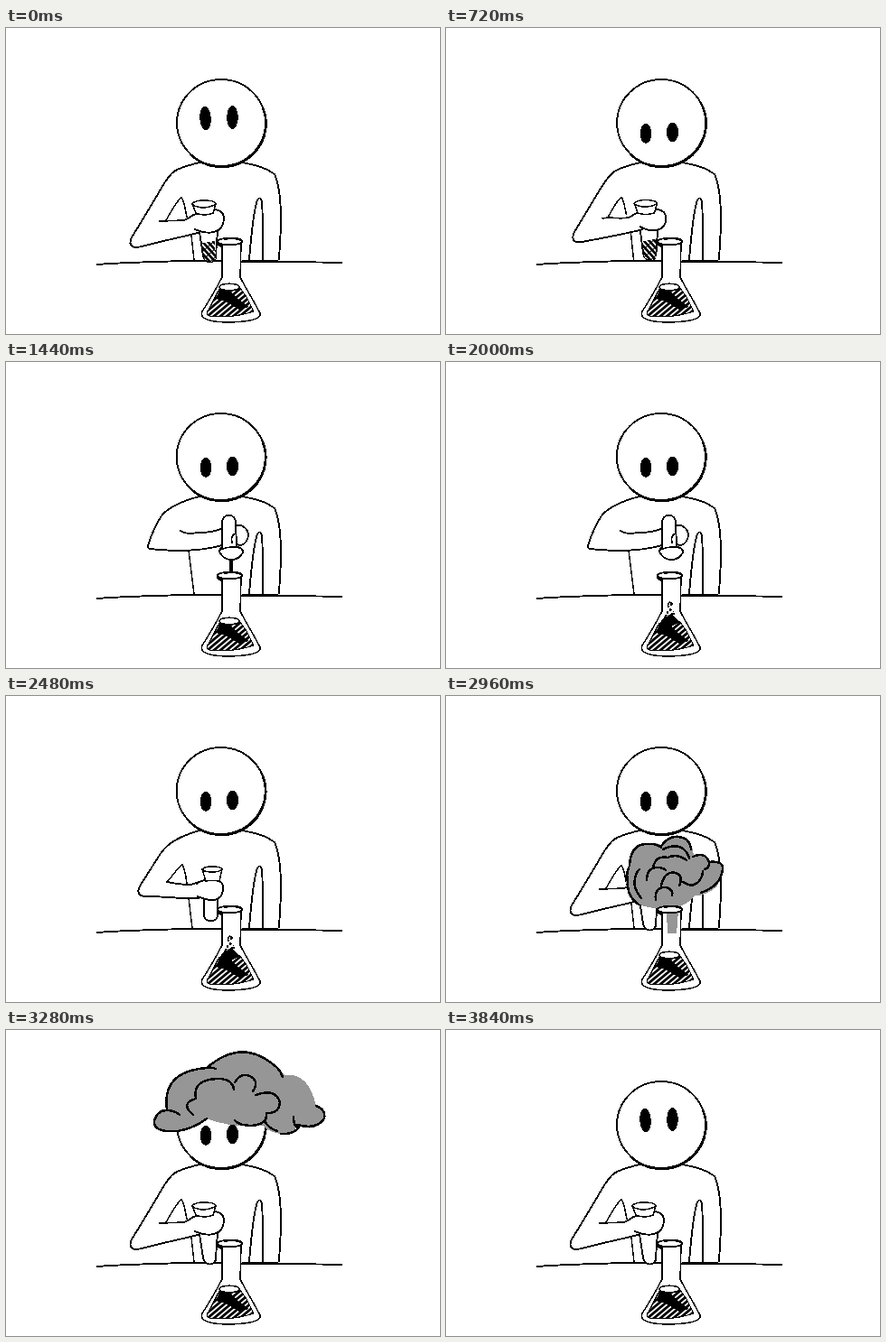
Write an HTML page that moves like this. It is 480x339 px and loops after 4.56 s.

```html
<!DOCTYPE html>
<html lang="en">
<head>
<meta charset="utf-8">
<title>Lab experiment</title>
<style>
  html, body { margin: 0; width: 100%; height: 100%; overflow: hidden; background: #fff; }
  svg { display: block; width: 100vw; height: 100vh; shape-rendering: crispEdges; }
  path, ellipse, circle { fill: none; stroke: #000; stroke-width: 1.9; stroke-linecap: round; stroke-linejoin: round; }
  .thin { stroke-width: 1.5; }
  .bold { stroke-width: 2.5; }
  .paper { fill: #fff; }
  .bare { stroke: none; }
  .ink { fill: #000; }
  .smoke { fill: #969696; stroke: none; }
  #fluid { fill: url(#scribble); }
  #liquid { fill: url(#hatch); stroke-width: 1.2; }
  #stream { stroke-width: 4; stroke-dasharray: 5 2 9 3; }
</style>
</head>
<body>
<svg viewBox="0 0 480 339">
  <defs>
    <pattern id="hatch" width="5" height="4.6" patternUnits="userSpaceOnUse" patternTransform="rotate(-40)">
      <rect width="5" height="4.6" fill="#fff"/><rect width="5" height="2.7"/>
    </pattern>
    <pattern id="scribble" width="7" height="4.4" patternUnits="userSpaceOnUse" patternTransform="rotate(48)">
      <rect width="7" height="4.4" fill="#fff"/><rect width="7" height="2.2"/><rect width="1.4" height="4.4"/>
    </pattern>
  </defs>

  <path d="M101 262 C125 260 160 259 200 258 L238 258 M259 259 C300 259 335 259 371 260"/>
  <path class="bold" d="M207 258 H238 M262 258.5 H300"/>
  <path d="M262 149 C275 152 287 154 297 162 C304 178 304 200 304 220 L302 256 M284 256 C284 230 284 205 283 192 Q280 184 277 194 C273 208 271 232 269 257"/>
  <g id="head">
    <ellipse class="paper" cx="238" cy="105" rx="49" ry="48"/>
    <path class="bold" d="M284 88 A49 48 0 0 1 204 140"/>
  </g>
  <g id="eyesUp">
    <ellipse class="ink bare" cx="220.5" cy="100" rx="6.3" ry="13.2" transform="rotate(-3 220.5 100)"/>
    <ellipse class="ink bare" cx="250.5" cy="99" rx="6.3" ry="12.8"/>
  </g>
  <g id="eyesDown">
    <ellipse class="ink bare" cx="221" cy="117" rx="6.3" ry="11"/>
    <ellipse class="ink bare" cx="250.5" cy="115.5" rx="6.6" ry="10.8"/>
  </g>

  <path id="side" class="thin"/>
  <path id="arm"/>
  <path id="forearm"/>
  <path id="armpit" class="thin"/>
  <g id="upBack">
    <path id="stem" class="paper"/>
    <path id="fluid" class="bare" d="M217 238 L231 236 L232 256 Q227 262 219 256 Z"/>
  </g>
  <path id="bump" class="paper thin" d="M226 197 C228 188 242 188 244 197"/>
  <path id="hand" class="paper"/>
  <path id="cup" class="paper thin"/>
  <path id="rim" class="paper thin"/>
  <circle id="end" cx="229" cy="214" r="8" class="thin"/>
  <g id="inverted">
    <path class="paper" d="M239 205 V178 C239 167 254 167 254 178 L255 204 Q263 207 262 211 Q258 219 249 219 Q240 219 236 210 Q236 207 239 205 Z"/>
    <path class="thin" d="M237 208 Q248 203 258 206 M254 190 Q248 192 250 200"/>
  </g>
  <path id="stream"/>

  <g id="cloud">
    <path id="puff" class="smoke"/>
    <path id="swirl" class="bold"/>
  </g>

  <path class="paper thin" d="M239 240 V276 C233 288 224 303 217 314 Q212 326 248 326 Q283 325 281 316 C275 304 266 290 259 276 L260 239"/>
  <path id="neck" class="smoke" d="M244 238 H257 L255 263 H245 Z"/>
  <path id="liquid" d="M236 289 Q247 293 258 287 L266 298 L274 314 Q250 322 225 319 Q220 318 224 312 Z"/>
  <path class="ink bare" d="M236 290 L247 291 L256 300 L269 309 L258 312 L243 303 L232 300 Z"/>
  <ellipse id="surface" class="paper thin" cx="247" cy="287" rx="11" ry="3.8"/>
  <g id="drops"><path class="ink thin" d="M236 291 L242 283 L250 281 L258 288 L249 292 Z"/></g>
  <ellipse class="paper" cx="247.5" cy="236.5" rx="13.5" ry="3.8"/>
  <path class="bold" d="M239 242 Q233 240 234 236 M242 233.5 Q255 232 260 235"/>
</svg>
<script>
const LOOP = 4560, STEP = 80;
const $ = id => document.getElementById(id);
const NUM = /-?\d+(\.\d+)?/g;

function mix(a, b, k) {
  const to = b.match(NUM);
  let i = 0;
  return a.replace(NUM, n => (+n + (to[i++] - n) * k).toFixed(2));
}
const show = (id, on) => { $(id).style.display = on ? '' : 'none'; };
const draw = (id, d) => $(id).setAttribute('d', d);
const move = (id, x, y) => $(id).setAttribute('transform', `translate(${x} ${y})`);

// Each part: resting, tilting, pouring, returning
const parts = {
  arm: [
    'M214 149 C186 156 183 158 172 177 C160 198 147 219 139 232 C134 243 142 244 150 242 C172 236 193 232 212 227',
    'M215 150 C192 155 182 160 172 173 C162 186 155 197 152 206 C150 214 156 215 163 215 C190 217 214 214 237 208',
    'M214 149 C190 155 180 162 173 169 C165 180 160 194 157 204 C156 208 162 207 170 208 C195 210 218 209 239 203',
    'M214 149 C190 156 180 163 172 173 C164 185 155 200 149 209 C143 218 148 223 157 222 C175 222 195 225 213 224'],
  forearm: [
    'M170 214 C180 213 190 214 197 213 C202 212 204 207 211 206',
    'M187 197 C197 198 205 199 213 200 C220 200 222 197 228 196',
    'M193 187 C198 191 205 190 213 189 C222 189 232 188 239 184',
    'M178 206 C188 208 196 209 203 209 C206 209 210 207 213 206'],
  armpit: [
    'M177 213 C183 203 188 192 194 188 C197 191 198 200 200 209',
    'M187 197 C189 193 191 188 194 185 C195 188 196 192 197 197',
    'M193 187 C193 187 193 187 193 187 C193 187 193 187 193 187',
    'M178 206 C184 200 189 191 195 187 C197 190 199 200 200 207'],
  hand: [
    'M211 206 C222 201 241 196 241 212 C240 227 225 230 209 223',
    'M228 196 C243 194 253 203 253 209 C252 217 243 219 237 208',
    'M254 181 C262 179 268 186 268 192 C267 201 259 206 255 201',
    'M211 208 C218 202 238 201 240 210 C241 224 233 231 212 222'],
  side: ['M205 230 L208 257', 'M202 215 L206 257', 'M202 209 L208 257', 'M202 224 L206 257']
};
const tube = {
  stem: ['M214 226 L218 252 C219 262 233 262 232 252 L234 225', 'M219 225 L219 243 C219 251 234 251 234 243 L234 225'],
  cup: ['M206 195 L210 205 Q219 209 229 205 L232 195', 'M217 192 L221 205 Q228 204 236 205 L239 192'],
  rim: ['M206 195 Q208 191 219 191 Q232 191 232 195 Q226 199 217 199 Q208 198 206 195',
        'M217 192 Q219 189 228 189 Q238 189 239 192 Q236 195 228 195 Q219 195 217 192']
};
const puff = [
  'M232 235 Q212 234 206 222 Q194 206 202 190 Q201 166 222 163 Q232 162 238 165 Q250 150 266 159 Q273 164 274 177 Q288 172 292 184 Q307 180 306 192 Q304 208 297 213 Q288 221 276 221 Q266 232 252 235 Q242 237 232 235',
  'M222 98 Q208 109 190 112 Q163 114 164 101 Q167 88 178 89 Q172 46 222 42 Q262 8 300 42 Q305 46 308 50 Q334 46 343 84 Q353 87 353 97 Q345 114 322 106 Q318 116 304 115 Q292 114 284 106 Q250 109 222 98'];
const swirl = [
  'M213 231 Q200 222 201 206 Q199 198 202 190 M216 224 Q206 212 209 202 Q211 194 214 192 M203 188 Q204 164 222 164 Q232 163 238 168 M238 166 Q250 150 266 159 Q271 164 271 170 M229 190 Q232 176 245 179 Q256 174 266 182 M240 170 Q254 163 262 169 Q268 174 269 180 M238 210 Q242 193 254 196 Q263 199 258 210 M273 178 Q287 172 291 184 Q292 190 286 192 M262 206 Q272 213 279 206 Q284 200 284 194 M291 184 Q307 182 306 192 Q304 210 282 218 M232 226 Q230 211 244 212 Q252 215 250 221 M222 204 Q222 190 234 190 Q240 190 243 193',
  'M222 98 Q208 109 190 112 Q163 114 164 101 M164 101 Q167 88 180 89 Q188 90 192 94 M178 88 Q172 46 222 42 Q228 41 232 43 M222 42 Q262 7 300 42 Q304 46 306 52 M207 94 Q192 81 210 76 Q206 55 234 54 M234 54 Q244 54 248 58 Q252 62 252 66 M253 58 Q262 44 274 54 Q279 60 273 68 M276 72 Q298 64 303 80 Q302 92 290 92 M288 92 Q290 104 272 106 Q258 106 253 100 M343 84 Q354 88 352 98 Q344 111 322 105 M318 96 Q318 108 324 108 Q318 116 304 115 M300 112 Q294 110 291 107 Q288 104 286 101'];

const timing = [[640, 0], [1040, 1], [1440, 2], [2080, 2], [2480, 3], [2720, 4]];
function poseAt(t) {
  if (t <= 640) return 0;
  for (let i = 1; i < timing.length; i++) {
    const [t0, a] = timing[i - 1], [t1, b] = timing[i];
    if (t <= t1) return a + (b - a) * (t - t0) / (t1 - t0);
  }
  return 4;
}

let seed = 7;
const rnd = () => (seed = seed * 16807 % 2147483647) / 2147483647;
let specks = '';
for (let i = 0; i < 42; i++) {
  const y = 290 - 26 * rnd() ** 1.5;
  const x = 248 + (rnd() - .5) * (y - 252) * .36;
  specks += `<circle class="ink bare" cx="${x}" cy="${y}" r="${.6 + rnd() * .6}"/>`;
}
$('drops').innerHTML += specks;

function arms(t) {
  const u = poseAt(t), i = Math.floor(u) % 4, k = u % 1;
  for (const id in parts) draw(id, mix(parts[id][i], parts[id][(i + 1) % 4], k));

  const end = u >= .7 && u < 1.25 || u >= 2.5 && u < 2.75;
  const over = u >= 1.25 && u < 2.5;
  const up = !end && !over;
  ['upBack', 'cup', 'rim'].forEach(id => show(id, up));
  ['end', 'bump'].forEach(id => show(id, end));
  show('inverted', over);
  // The tube stays empty until the loop restarts
  show('fluid', u < 2);

  const lift = u < 1 ? u : u < 3 ? 1 : 4 - u;
  for (const id in tube) draw(id, mix(...tube[id], lift));
  move('fluid', lift * 3, lift * -10);
  $('end').style.fill = u < 2 ? 'url(#scribble)' : '#fff';
  const shift = u < 2 ? u - 1 : (3 - u) * .6;
  ['end', 'bump'].forEach(id => move(id, shift * 14, -shift * 12));
  const back = Math.abs(u - 2);
  move('inverted', -back * 13, back * 7);
}

function pour(t) {
  const on = t >= 1360 && t < 1840;
  show('stream', on);
  if (on) {
    const top = t < 1680 ? 220 : 220 + (t - 1600) * .2;
    draw('stream', `M249 ${top} L248 ${Math.min(282, 236 + (t - 1360) * .5)}`);
  }
  const wet = t >= 1520 && t < 2640;
  show('drops', wet);
  show('surface', !wet);
}

function smoke(t) {
  show('neck', t >= 2560 && t < 3120);
  const on = t >= 2640 && t < 3440;
  show('cloud', on);
  if (!on) return;
  const rise = Math.min(1, Math.max(0, (t - 2960) / 320));
  const grow = Math.min(1, (t - 2560) / 400);
  const fade = t >= 3360;
  draw('puff', mix(...puff, rise));
  draw('swirl', mix(...swirl, rise));
  $('cloud').setAttribute('transform', fade
    ? 'translate(258 0) scale(1.08 1) translate(-258 0)'
    : `translate(247 236) scale(${grow}) translate(-247 -236)`);
  $('puff').style.opacity = fade ? .5 : 1;
  $('swirl').style.strokeDasharray = fade ? '14 12' : 'none';
}

function frame(now) {
  const n = Math.floor(now % LOOP / STEP), t = n * STEP;
  const busy = t >= 720 && t < 2640;
  move('head', busy ? Math.sin(n * 2.4) * .4 : 0, 0);
  const down = t >= 720 && t < 3840;
  show('eyesDown', down);
  show('eyesUp', !down);
  arms(t);
  pour(t);
  smoke(t);
}

const start = performance.now();
function tick() {
  frame(performance.now() - start);
  requestAnimationFrame(tick);
}
tick();
</script>
</body>
</html>
```
